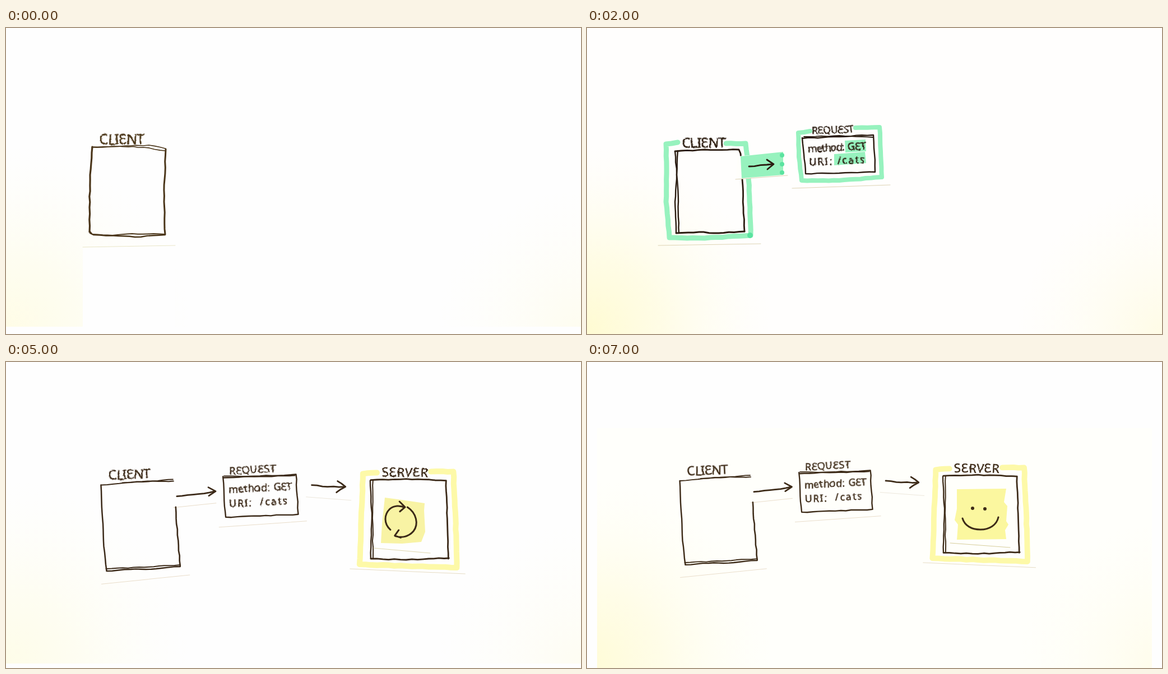
Animation, 1026 px wide and 546 px high, one loop 8 s. Source, as an HTML page:

```html
<!DOCTYPE html>
<html lang="en">
<head>
<meta charset="utf-8">
<title>Client and server</title>
<style>
  html, body { margin: 0; width: 100%; height: 100%; overflow: hidden; background: #fefefe; }
  svg { display: block; width: 1026px; height: 546px; }
  path { fill: none; stroke-linecap: round; stroke-linejoin: round; }
  .ink { stroke: currentColor; }
  text { fill: currentColor; stroke: currentColor; stroke-width: .55; font-family: "Noto Sans", sans-serif; filter: url(#wobble); }
  .scene { visibility: hidden; }
  .scene.on { visibility: visible; }
</style>
</head>
<body>
<svg id="stage" viewBox="0 0 1026 546"></svg>
<script>
const GREEN = '#97f2be', DARK_GREEN = '#5be3a0', YELLOW = '#fbf79f', GLOW = '#fdf9a8';

let seed = 7;
const rand = () => (seed = seed * 16807 % 2147483647) / 2147483647;
const jitter = n => (rand() - .5) * 2 * n;

// Splits a polyline into short steps and shakes them like a hand-held pen.
function rough(points, shake = .7) {
  const p = points.split(' ').map(s => s.split(',').map(Number));
  let d = 'M' + p[0];
  for (let i = 1; i < p.length; i++) {
    const [x0, y0] = p[i - 1], [x1, y1] = p[i];
    const n = Math.max(1, Math.round(Math.hypot(x1 - x0, y1 - y0) / 10));
    for (let k = 1; k <= n; k++) {
      const s = k < n ? shake : 0;
      d += `L${(x0 + (x1 - x0) * k / n + jitter(s)).toFixed(1)} ${(y0 + (y1 - y0) * k / n + jitter(s)).toFixed(1)}`;
    }
  }
  return d;
}

const ink = (points, w = 2.4) => `<path class="ink" stroke-width="${w}" d="${rough(points)}"/>`;
const curve = (d, w = 3) => `<path class="ink" stroke-width="${w}" d="${d}"/>`;
const marker = (points, color, w) => `<path stroke="${color}" stroke-width="${w}" d="${rough(points, .6)}"/>`;
const edge = (points, color = '#ddd3b4') => `<path stroke="${color}" stroke-width="1" d="M${points.replace(' ', 'L')}"/>`;
const patch = (points, color) => `<polygon points="${points}" fill="${color}"/>`;
const dot = (x, y, r, color) => `<circle cx="${x}" cy="${y}" r="${r}" fill="${color}"/>`;
const arrow = (shaft, head) => ink(shaft, 2.8) + ink(head, 2.8);

function word(str, x, y, size, spacing = 0, angle = -1) {
  const tilt = [...str].map(() => jitter(5).toFixed(1)).join(' ');
  return `<text aria-label="${str}" font-size="${size}" letter-spacing="${spacing}" rotate="${tilt}"
    transform="translate(${x} ${y}) rotate(${angle})">${str.replace(/E/g, 'Ɛ')}</text>`;
}

function paper({ base = '#fefefe', left = 0, right = 0, x = 0, top = 0, w = 1026, bottom = 546 }) {
  const box = fill => `<rect x="${x}" y="${top}" width="${w}" height="${bottom - top}" ${fill}/>`;
  return '<rect width="1026" height="546" fill="#fefefe"/>' + box(`fill="${base}"`) +
    box(`fill="url(#left)" opacity="${left}"`) + box(`fill="url(#right)" opacity="${right}"`);
}

const client = () =>
  patch('137,392 302,389 302,533 137,533', '#fefefe') +
  edge('137,391 302,388', '#e9e6c8') +
  word('CLIENT', 166, 207, 25, -1) +
  ink('154,212 150,262 149,320 149,364', 3.2) + ink('150,366 156,369 200,371 230,373 284,369', 2.4) +
  ink('150,363 154,368 190,370 225,367 283,368', 2) + ink('285,216 283,270 282,310 284,368', 3) +
  ink('153,213 200,211 245,213 284,219', 1.6) + ink('155,212 190,212 222,210 255,209 284,215', 1.6);

const greenClient = () =>
  edge('127,388 310,385') +
  marker('162,204 141,207 142,260 141,310 147,374 210,375 292,370 290,310 288,250 283,206 248,206', GREEN, 9) +
  dot(291, 370, 5, DARK_GREEN) +
  word('CLIENT', 169, 213, 24, -.8) +
  ink('157,220 210,217 271,217 274,224 277,270 279,320 281,363', 2.8) + ink('157,220 160,260 157,310 159,365', 2.4) +
  ink('162,219 160,262 163,310 164,366', 2.4) + ink('159,366 200,364 235,366 281,363', 3);

const greenArrow = () =>
  patch('268,229 354,221 356,263 266,270', '#fffefb') + edge('265,270 358,263') +
  patch('274,229 350,221 350,262 276,268', GREEN) +
  [227, 243, 258].map(y => dot(348, y, 4, DARK_GREEN)).join('') +
  arrow('289,247 331,243', '321,235 333,243 322,252');

const greenRequest = () =>
  edge('366,286 541,280') +
  marker('398,184 377,187 378,230 383,272 450,272 526,266 524,220 522,177 479,178', GREEN, 8) +
  word('REQUEST', 400, 188, 17.5, -.3, -2) +
  ink('384,197 440,194 511,191 513,225 514,257 450,259 390,260 387,225 384,196') + ink('387,194 450,192 510,195', 1.8) +
  patch('460,201 497,199 498,220 461,222', GREEN) + patch('441,225 496,221 498,241 441,245', GREEN) +
  word('method:', 393, 221, 18, -.9, -3) + word('GET', 464, 217, 18, 0, -2) +
  word('URI:', 395, 244, 18, 2, -1) + word('/cats', 446, 242, 18, 2, -3);

const plainServer = () =>
  edge('611,375 778,381', '#e0dcd2') +
  word('SERVER', 650, 206, 22, .5, 2) +
  ink('637,221 638,212 700,214 769,224 768,270 766,310 767,360') +
  ink('633,265 632,300 629,349', 2.6) +
  ink('629,350 670,354 720,358 766,361', 2.6) + ink('630,348 680,357 730,357 765,360', 2);

const secondGreenArrow = () =>
  patch('539,214 633,221 634,265 535,256', '#fffffb') + edge('535,256 634,265') +
  patch('551,218 629,224 628,264 547,255', GREEN) +
  dot(625, 229, 4, DARK_GREEN) + dot(624, 243, 4, DARK_GREEN) + dot(622, 258, 4, DARK_GREEN) +
  arrow('560,240 612,244', '599,235 613,244 599,253');

// Client, request and highlighted server, shared by the last scenes.
const answer = () =>
  edge('148,377 305,361', '#e9ddca') + edge('276,241 352,233', '#e9ddca') +
  edge('357,276 513,265', '#e9ddca') + edge('512,222 592,228', '#ece7dc') + edge('590,350 795,359', '#e6dcc4') +
  word('CLIENT', 160, 191, 23, -.8, -3) +
  ink('148,201 190,197 230,194 276,194', 2) + ink('185,197 230,195 275,191', 2) +
  ink('147,201 149,250 152,310 157,353', 2.5) + ink('157,354 200,351 245,350 288,346', 2.4) +
  ink('156,350 215,347 250,345 288,343', 2) + ink('280,240 283,290 288,345', 2.6) +
  arrow('282,221 320,217 350,212', '338,205 351,212 339,220') +
  word('REQUEST', 374, 181, 18, .6, -3) +
  ink('364,188 430,185 494,182 496,220 498,253 430,256 369,258 366,220 364,186') + ink('366,185 430,186 492,184', 2) +
  word('method:', 373, 214, 18, .4, -3) + word('GET', 453, 209, 18, -.4, -1) +
  word('URI:', 374, 239, 18, 1.5, -2) + word('/cats', 429, 236, 18, 2.2, -2) +
  arrow('522,201 550,204 581,204', '568,194 582,204 566,214') +
  marker('638,179 613,181 611,240 607,342 690,345 780,348 778,260 774,177 734,177', GLOW, 10) +
  word('SERVER', 646, 185, 22, .6, 0) +
  ink('627,192 690,190 761,193 763,260 765,332', 2.8) + ink('626,193 629,260 627,331') +
  ink('631,192 630,260 631,331', 2) + ink('627,332 690,334 730,332 766,331', 2.8);

const cycle = (x, y, turn) => `<g transform="translate(${x} ${y}) rotate(${turn})">` +
  curve('M-9 -25C10 -29 27 -18 29 -2C30 12 22 22 12 27M9 15L11 27L21 22') +
  curve('M-2 25C-18 26 -29 14 -29 0C-28 -10 -21 -18 -12 -21M-26 -22L-12 -22L-13 -10') + '</g>';

const smile = () =>
  edge('648,323 755,331', '#d6cd9c') +
  patch('660,227 748,226 744,250 750,257 748,284 752,290 746,300 748,316 660,317 662,290 656,282 660,262', YELLOW) +
  dot(688, 261, 3, 'currentColor') + dot(710, 262, 3, 'currentColor') +
  curve('M670 279C674 292 686 299 702 299C718 299 731 291 734 277');

const place = (scale, x, y, body) => `<g transform="matrix(${scale} 0 0 ${scale} ${x} ${y})">${body}</g>`;
const scene = (color, sheet, body) => `<g class="scene" color="${color}">${paper(sheet)}${body}</g>`;

// Reseeding keeps every copy of a card identical.
const draw = part => { seed = 7; return part(); };
const parts = (...list) => list.map(draw).join('');

const turned = (x, y, turn) =>
  edge(`${x - 49},${y + 49} ${x + 52},${y + 58}`, '#dfd7ae') +
  `<g transform="translate(${x} ${y})">${patch('-29,-41 -6,-38 42,-31 41,-18 43,20 36,38 2,41 -36,40 -34,5', '#f8f3a4')}</g>` +
  cycle(x, y, turn);

document.getElementById('stage').innerHTML = `<defs>
  <filter id="wobble" x="-10%" y="-20%" width="120%" height="140%">
    <feTurbulence baseFrequency=".07" numOctaves="1" seed="3"/>
    <feDisplacementMap in="SourceGraphic" scale="3" xChannelSelector="R" yChannelSelector="G"/>
  </filter>
  <radialGradient id="left" gradientUnits="userSpaceOnUse" cx="0" cy="540" r="330">
    <stop stop-color="#fffbd2"/><stop offset=".4" stop-color="#fffce0" stop-opacity=".8"/><stop offset="1" stop-color="#fffdf0" stop-opacity="0"/>
  </radialGradient>
  <radialGradient id="right" gradientUnits="userSpaceOnUse" cx="1026" cy="546" r="260">
    <stop stop-color="#fffbe0"/><stop offset="1" stop-color="#fffdf0" stop-opacity="0"/>
  </radialGradient></defs>` + [
  scene('#4a3519', { left: .55, right: .5, bottom: 533 }, parts(client)),
  scene('#2a1b10', { left: .8, right: .6, bottom: 535 }, place(1, 0, -22, parts(greenClient))),
  scene('#2a1b10', { base: '#fffefd', left: 1, right: .8 }, parts(greenClient, greenArrow, greenRequest)),
  scene('#2c1d12', { base: '#fffffc', left: 1, right: 1, bottom: 544 },
    place(1.026, 10, .5, parts(greenClient, greenArrow, greenRequest)) + parts(plainServer, secondGreenArrow)),
  scene('#362414', { base: '#fffefb', left: .9, right: .7, bottom: 519 }, parts(answer) +
    edge('642,307 745,307', '#d8cf9e') +
    patch('660,223 695,225 730,222 731,234 736,236 737,298 655,298 658,262', YELLOW) + cycle(693, 264, 0)),
  scene('#3b2918', { left: .5, right: .4, bottom: 538 }, place(1.003, 22, 18, parts(answer)) + turned(705, 283, 45)),
  scene('#3b2918', { left: .5, right: .4, bottom: 538 }, place(1.003, 22, 22, parts(answer)) + turned(705, 287, 92)),
  scene('#3d2b18', { base: '#fffffb', left: .9, right: .6, x: 18, top: 118, w: 990 },
    place(.98, 21.5, 15, parts(answer)) + smile())
].join('');

const scenes = [...document.querySelectorAll('.scene')];
const start = performance.now();
let shown = -1;

function tick() {
  const now = Math.floor((performance.now() - start) % 8000 / 1000);
  if (now !== shown) {
    scenes.forEach((s, i) => s.classList.toggle('on', i === now));
    shown = now;
  }
  requestAnimationFrame(tick);
}
tick();
</script>
</body>
</html>
```
